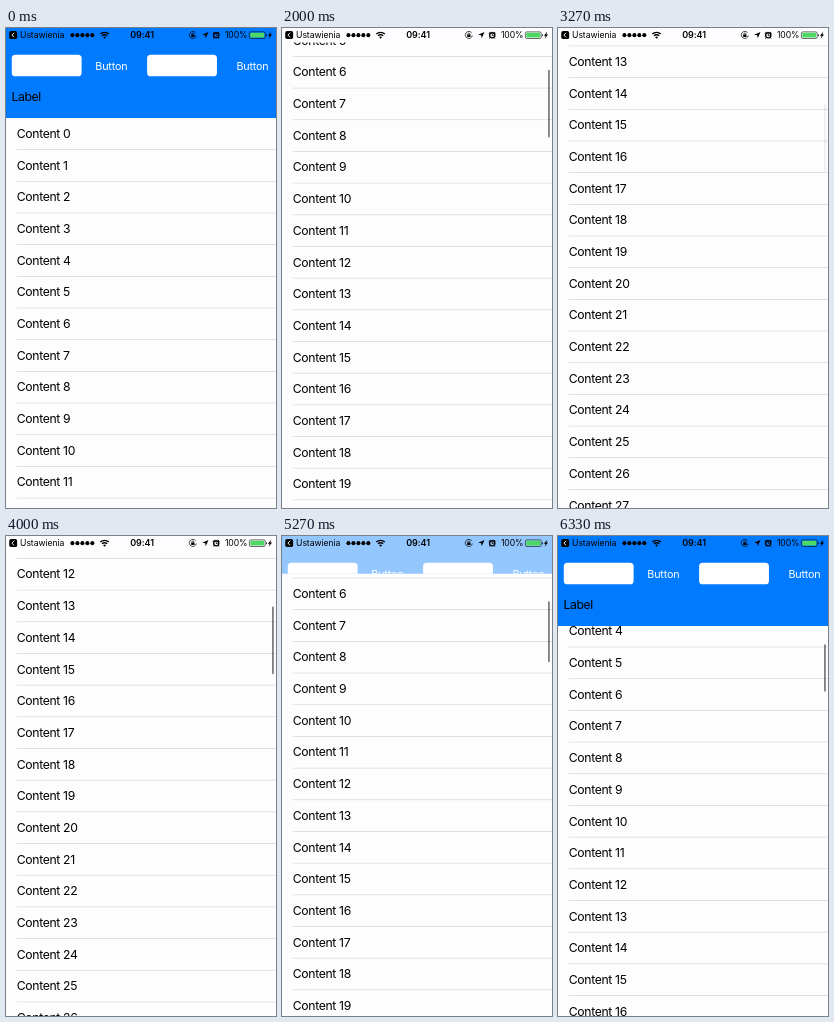
Recreate the animation shown at these times as an HTML page. Size 270 px wide and 480 px high, loop 6.39 s.

```html
<!DOCTYPE html>
<html lang="pl">
<head>
<meta charset="utf-8">
<title>Collapsing header</title>
<style>
html, body { margin: 0; width: 100%; height: 100%; overflow: hidden; background: #fefdfe; }
#stage { display: block; width: 270px; height: 480px; font: 17px Inter, Roboto, sans-serif; letter-spacing: -.5px; }
#buttons { font-size: 15px; letter-spacing: -.25px; fill: #fff; }
#status { font-size: 12px; letter-spacing: -.1px; }
.line { fill: none; stroke: #000; }
</style>
</head>
<body>
<svg id="stage" viewBox="0 0 375 666.667">
  <rect width="375" height="667" fill="#fefdfe"/>
  <g id="list"></g>
  <rect id="bar" x="369.5" width="2.5" rx="1.25" fill="#000" fill-opacity=".5"/>

  <svg id="header" width="375" height="125">
    <rect id="tint" width="375" height="125"/>
    <g fill="#fff">
      <rect x="8" y="37" width="97" height="30" rx="5"/>
      <rect x="196" y="37" width="97" height="30" rx="5"/>
    </g>
    <g id="buttons">
      <text x="124" y="57.7">Button</text>
      <text x="320" y="57.7">Button</text>
    </g>
    <text x="7.5" y="101">Label</text>
  </svg>

  <g id="status">
    <rect x="4.5" y="4.3" width="11" height="11" rx="2.5"/>
    <path class="line" d="M11.3 6.6 8.2 9.8l3.1 3.2" style="stroke:#fff" stroke-width="1.3"/>
    <text x="19.5" y="14">Ustawienia</text>
    <g id="dots"></g>
    <g class="line" stroke-width="1.8">
      <path d="M131 8.4a8.3 8.3 0 0 1 11.8 0"/>
      <path d="M133.3 10.9a5 5 0 0 1 7.2 0"/>
    </g>
    <path d="M136.9 14.9l-2-2.2a2.9 2.9 0 0 1 4 0z"/>
    <text x="189" y="14" text-anchor="middle" font-weight="600" font-size="12.5">09:41</text>
    <path class="line" d="M263.4 6.7a4.9 4.9 0 1 0 .9 3.8" stroke-width="1"/>
    <path class="line" d="M258.1 9.6V8.4a1.4 1.4 0 0 1 2.8 0v1.2" stroke-width=".9"/>
    <rect x="257.2" y="9.2" width="4.6" height="3.4" rx=".5"/>
    <path d="M281.2 5.4 277.4 14.4 276.7 10.1 272.4 9.4z"/>
    <circle cx="292" cy="10.2" r="3.6" class="line" stroke-width="1.9"/>
    <path class="line" d="M292 8v2.4h2M287.4 7.6l2.3-2.3M296.6 7.6l-2.3-2.3M289.3 13.3l-1.2 1.4M294.7 13.3l1.2 1.4" stroke-width="1.2"/>
    <text x="304" y="14">100%</text>
    <rect x="338" y="5.4" width="22" height="9.2" rx="2" class="line" stroke-width=".8"/>
    <rect x="339.3" y="6.7" width="19.4" height="6.6" rx="1" fill="#4cd964"/>
    <path d="M361.2 8.3a1.8 1.8 0 0 1 0 3.4z"/>
    <path d="M368.4 5 363.8 10.7H366.2L364.8 15 369.6 9.2H367.1z"/>
  </g>
</svg>
<script>
const LOOP = 6390, STEP = 200 / 3, ROW = 44, ROWS = 100, VIEW = 666.667;
const MIN = 20, MAX = 125;
const $ = id => document.getElementById(id);

// [time in ms, value]
const scroll = [[667, 0], [1000, 59], [1330, 180], [1600, 219], [1860, 219], [2000, 244.5],
  [2530, 458], [3133, 567], [3640, 567], [4600, 350.5], [4900, 288], [5270, 257.8],
  [5800, 217], [6333, 190.7]];
const barFade = [[667, 0], [733, 1], [3133, 1], [3200, .5], [3267, .12], [3640, .12], [3666, 1]];

let rows = '', dots = '';
for (let i = 0; i < 30; i++) {
  const y = i * ROW;
  rows += `<text x="15" y="${y + 27.8}">Content ${i}</text>` +
    `<rect x="15" y="${y + 43.4}" width="360" height="1" fill="#d6d5da"/>`;
}
for (let i = 0; i < 5; i++) dots += `<circle cx="${92.3 + i * 6.9}" cy="9.9" r="2.8"/>`;
$('list').innerHTML = rows;
$('dots').innerHTML = dots;

const clamp = (v, lo, hi) => Math.min(hi, Math.max(lo, v));

// Monotone cubic through the keys, constant outside them
function curve(keys, t) {
  const last = keys.length - 1;
  if (t <= keys[0][0]) return keys[0][1];
  if (t >= keys[last][0]) return keys[last][1];
  const i = keys.findIndex(k => k[0] > t) - 1;
  const rise = j => (keys[j + 1][1] - keys[j][1]) / (keys[j + 1][0] - keys[j][0]);
  const slope = j => {
    if (j === 0 || j === last) return 0;
    const a = rise(j - 1), b = rise(j);
    return a * b > 0 ? 2 * a * b / (a + b) : 0;
  };
  const [t0, v0] = keys[i], [t1, v1] = keys[i + 1];
  const d = t1 - t0, u = (t - t0) / d, w = 1 - u;
  return w * w * ((1 + 2 * u) * v0 + u * d * slope(i)) +
    u * u * ((3 - 2 * u) * v1 - w * d * slope(i + 1));
}

function draw(now) {
  const t = Math.floor((now % LOOP + 4) / STEP) * STEP;
  const offset = curve(scroll, t);
  const open = t < 3400 ? MAX + 8 - offset : MAX - (offset - 190.7) * 1.076;
  const height = clamp(open, MIN, MAX);
  const view = VIEW - height, ratio = view / (ROW * ROWS);

  $('list').setAttribute('transform', `translate(0 ${height - offset})`);
  $('header').setAttribute('height', height);

  const p = (MAX - height) / (MAX - MIN);
  const white = .84 * p + .16 * p ** 8;
  $('tint').setAttribute('fill', `rgb(${254 * white}, ${122 + 131 * white}, 255)`);

  $('bar').setAttribute('y', height + 2 + offset * ratio);
  $('bar').setAttribute('height', view * ratio - 1);
  $('bar').setAttribute('opacity', curve(barFade, t));
  requestAnimationFrame(draw);
}
draw(performance.now());
</script>
</body>
</html>
```
